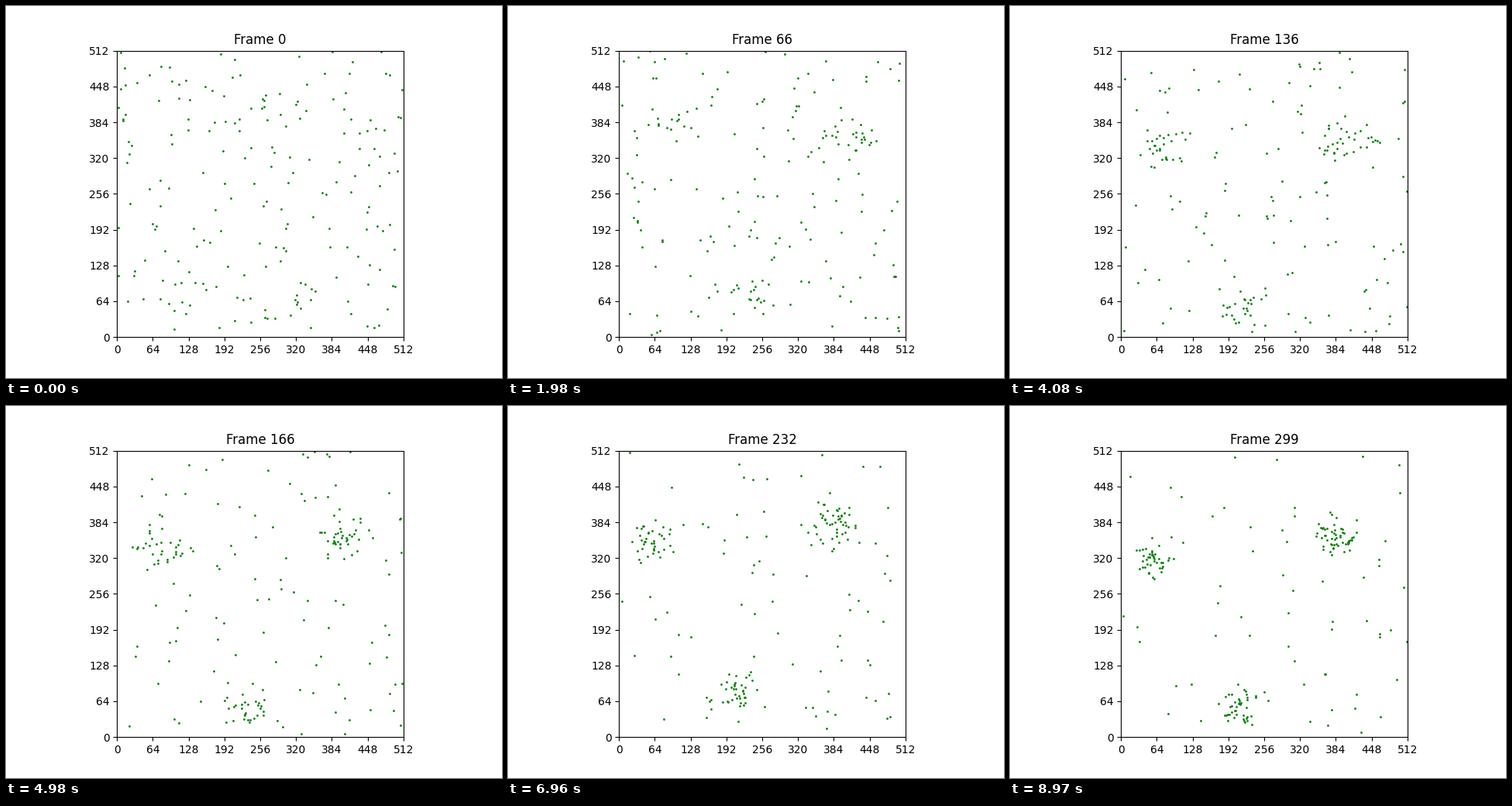
Write a matplotlib script that moves like this. It is 640 px wide and 480 px high and loops after 9 s.

```python
import numpy as np
import matplotlib.pyplot as plt
from matplotlib.animation import FuncAnimation

SIZE = 512
COUNT = 200
FRAMES = 300
REACH = 82      # distance at which a hub is noticed
TURN = 0.1      # steepest steering per step, radians
WANDER = 0.09   # random heading change per step

# Gathering spots glide from start to end
HUBS = [(95 + 370j, 50 + 328j), (428 + 352j, 375 + 375j), (240 + 60j, 203 + 70j)]


def steer(pos, angle, t):
    """Turn agents towards the hub in reach; swarms tighten with time."""
    p = t / (FRAMES - 1)
    core = 42 - 20 * p
    sway = 9 * np.exp(4j * np.pi * p)
    turn = np.zeros(COUNT)
    for start, end in HUBS:
        gap = start + (end - start) * p + sway - pos
        error = np.angle(gap * np.exp(-1j * angle))
        near = (abs(gap) > core) & (abs(gap) < REACH)
        turn[near] = np.clip(error, -TURN, TURN)[near]
    return angle + turn


def bounce(value, step):
    """Mirror positions and steps at the walls."""
    inside = SIZE - abs(SIZE - abs(value))
    return inside, np.where(inside == value, step, -step)


def simulate():
    rng = np.random.default_rng(7)
    pos = rng.uniform(0, SIZE, COUNT) + 1j * rng.uniform(0, SIZE, COUNT)
    angle = rng.uniform(-np.pi, np.pi, COUNT)
    speed = rng.uniform(0.9, 1.7, COUNT)
    path = [pos]
    for t in range(1, FRAMES):
        angle = steer(pos, angle, t) + rng.normal(0, WANDER, COUNT)
        step = speed * np.exp(1j * angle)
        raw = pos + step
        x, dx = bounce(raw.real, step.real)
        y, dy = bounce(raw.imag, step.imag)
        # Rounding in the mirror must not count as a hit
        dx = np.where(abs(x - raw.real) < 1e-6, step.real, dx)
        dy = np.where(abs(y - raw.imag) < 1e-6, step.imag, dy)
        pos, angle = x + 1j * y, np.arctan2(dy, dx)
        path.append(pos)
    return path


path = simulate()

fig, ax = plt.subplots(figsize=(6.4, 4.8), dpi=100)
ax.set_aspect("equal")
ticks = range(0, SIZE + 1, 64)
ax.set(xlim=(0, SIZE), ylim=(0, SIZE), xticks=ticks, yticks=ticks)
dots, = ax.plot([], [], "g.", markersize=2)
title = ax.set_title("Frame 0")


def update(i):
    dots.set_data(path[i].real, path[i].imag)
    title.set_text(f"Frame {i}")
    return dots, title


anim = FuncAnimation(fig, update, frames=FRAMES, interval=30,
                     repeat=True, repeat_delay=0)
plt.show()
```
